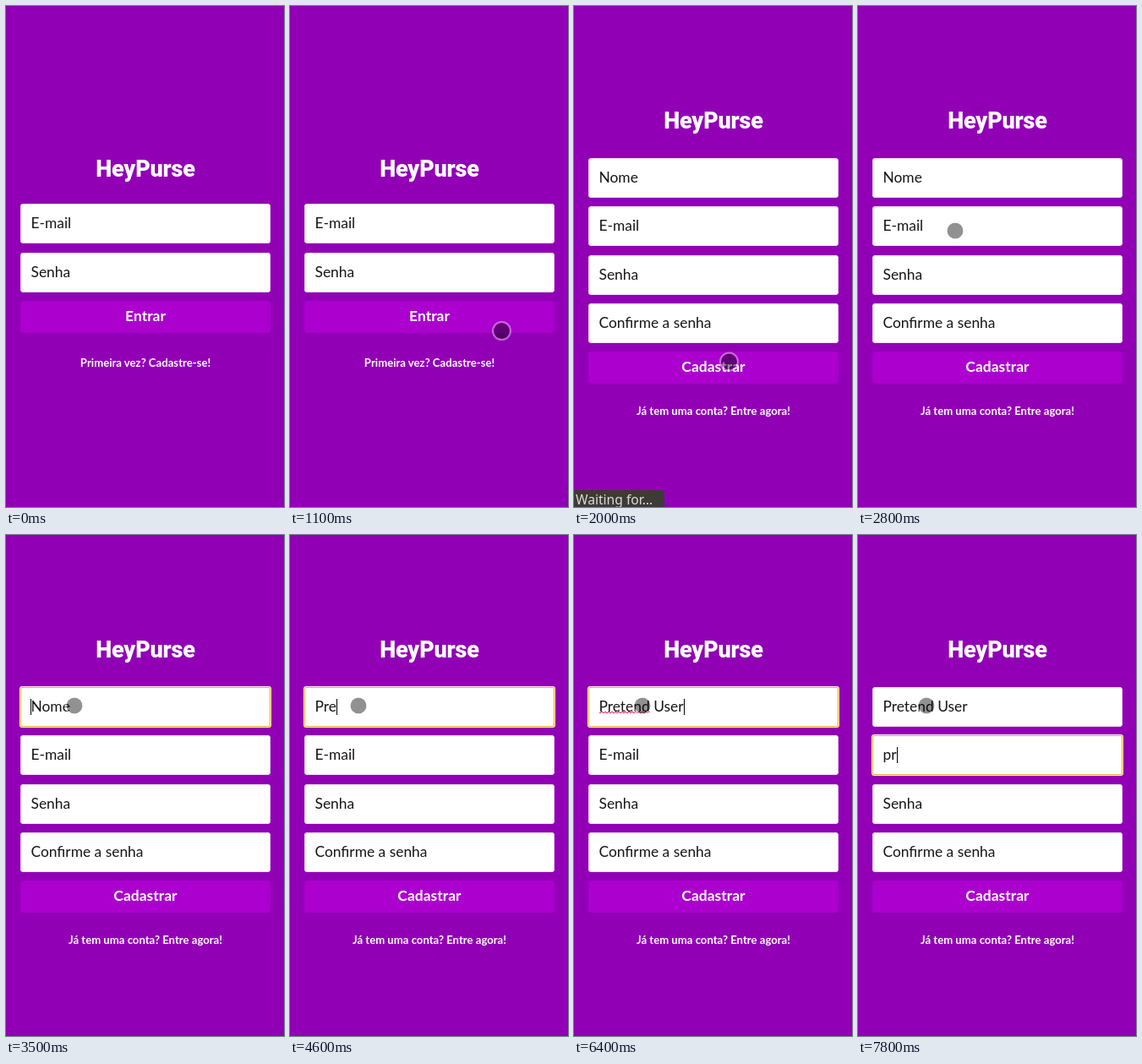
Animation of 329 by 593 pixels, one loop 8000 ms. Source, as an HTML page:

```html
<!DOCTYPE html>
<html lang="pt-BR">
<head>
<meta charset="utf-8">
<title>Cadastro</title>
<style>
  html, body { margin: 0; width: 100%; height: 100%; overflow: hidden; background: #9200b6; }
  #stage {
    position: relative; width: 329px; height: 593px; overflow: hidden;
    background: #9200b6; color: #fff; font-family: Lato, sans-serif;
  }
  #stage [hidden] { display: none; }
  .page { position: absolute; inset: 0; }
  .page > * { position: absolute; left: 17px; width: 296px; box-sizing: border-box; }
  h1 {
    margin: 0; height: 40px; text-align: center; letter-spacing: -.2px;
    font: 900 27px/40px Roboto, sans-serif;
  }
  .field {
    height: 47px; padding-left: 12.5px; border-radius: 4px;
    background: #fff; box-shadow: inset 0 0 0 1px #eddff1;
    color: #161616; font-size: 17.4px; line-height: 46px; white-space: pre;
  }
  .focus { border-radius: 2px; box-shadow: inset 0 0 0 1px #e9a640, 0 0 0 1px #fdf3dc; }
  .caret::after {
    content: ""; display: inline-block; width: 1px; height: 19px;
    margin-right: -1px; vertical-align: -4px; background: #000;
  }
  .edge::before {
    content: ""; position: absolute; left: 12px; top: 14px; width: 1px; height: 19px; background: #000;
  }
  .typo {
    --dash: linear-gradient(90deg, #e3174f 50%, transparent 0);
    background: var(--dash) 0 calc(100% - 2px) / 4px 1px repeat-x,
                var(--dash) 2px calc(100% - 3px) / 4px 1px repeat-x;
  }
  .button {
    height: 38px; border-radius: 4px; background: #ab00ce;
    font-weight: 700; font-size: 17.5px; line-height: 35px; text-align: center;
  }
  .link { height: 20px; font-weight: 700; font-size: 13.15px; line-height: 20px; text-align: center; }
  #status {
    position: absolute; left: 0; top: 573px; width: 107px; height: 20px; box-sizing: border-box;
    padding-left: 2px; border-radius: 0 4px 0 0; background: #3c3b37; color: #dfdbd2;
    font: 15.6px/22px "Noto Sans", sans-serif; white-space: nowrap;
  }
  #touch {
    position: absolute; left: -11.5px; top: -11.5px; width: 19px; height: 19px;
    border: 2px solid rgba(255, 255, 255, .4); border-radius: 50%;
    background: rgba(0, 0, 0, .43); background-clip: padding-box;
  }
</style>
</head>
<body>
<div id="stage">
  <div class="page" id="login">
    <h1 style="top:173px">HeyPurse</h1>
    <div class="field" style="top:234px">E-mail</div>
    <div class="field" style="top:291.5px">Senha</div>
    <div class="button" style="top:348.5px">Entrar</div>
    <div class="link" style="top:412px">Primeira vez? Cadastre-se!</div>
  </div>
  <div class="page" id="signup" hidden>
    <h1 style="top:116px">HeyPurse</h1>
    <div class="field" id="name" style="top:180px">Nome</div>
    <div class="field" id="mail" style="top:237px">E-mail</div>
    <div class="field" style="top:295px">Senha</div>
    <div class="field" style="top:352.4px">Confirme a senha</div>
    <div class="button" style="top:409px">Cadastrar</div>
    <div class="link" style="top:469px">Já tem uma conta? Entre agora!</div>
  </div>
  <div id="status" hidden>Waiting for…</div>
  <div id="touch" hidden></div>
</div>
<script>
const LOOP = 8000;
const FULL_NAME = "Pretend User", MAIL = "pr";
const [login, signup, nameBox, mailBox, statusBar, touch] =
  ["login", "signup", "name", "mail", "status", "touch"].map(id => document.getElementById(id));

// Time, x, y of the touch point
const path = [
  [1000, 318, 346], [1100, 250, 384], [1200, 195.5, 411],
  [1400, 195.5, 406], [1500, 189, 414], [1600, 183, 420.5],
  [2600, 172, 396], [2700, 143, 330], [2800, 114.5, 265.5],
  [2900, 91, 218], [3000, 81, 204.5], [3200, 80.5, 201.5]
];
const nameKeys = [4200, 4500, 4600, 4800, 4900, 5100, 5200, 5500, 5800, 6000, 6200, 6400];
const mailKeys = [7500, 7800];

const within = (t, from, to) => t >= from && t < to;
const typed = (t, keys) => keys.filter(k => t >= k).length;

function setText(box, text, typo) {
  const key = text + "|" + typo;
  if (box.dataset.key === key) return;
  box.dataset.key = key;
  if (!typo) { box.textContent = text; return; }
  const [first, last] = text.split(" ");
  const word = document.createElement("span");
  word.className = "typo";
  word.textContent = first;
  box.replaceChildren(word, " " + last);
}

// The caret blinks once before the placeholder, then follows the text
function setFocus(box, on, hasText, blink) {
  box.classList.toggle("focus", on);
  box.classList.toggle("caret", on && hasText);
  box.classList.toggle("edge", on && blink);
}

function draw(t) {
  login.hidden = t >= 2000;
  signup.hidden = t < 2000;
  statusBar.hidden = !within(t, 2000, 2400);
  statusBar.style.opacity = t < 2300 ? 1 : .5;

  const spot = path.filter(p => t >= p[0]).pop();
  touch.hidden = !spot;
  if (spot) touch.style.transform = `translate(${spot[1]}px, ${spot[2]}px)`;

  const n = typed(t, nameKeys), m = typed(t, mailKeys);
  setText(nameBox, FULL_NAME.slice(0, n) || "Nome", within(t, 5500, 6800));
  setText(mailBox, MAIL.slice(0, m) || "E-mail", false);
  setFocus(nameBox, within(t, 3500, 6800), n > 0, t < 4000);
  setFocus(mailBox, t >= 6800, m > 0, t < 7300);
}

const start = performance.now();
function tick() {
  draw((performance.now() - start) % LOOP);
  requestAnimationFrame(tick);
}
draw(0);
requestAnimationFrame(tick);
</script>
</body>
</html>
```
